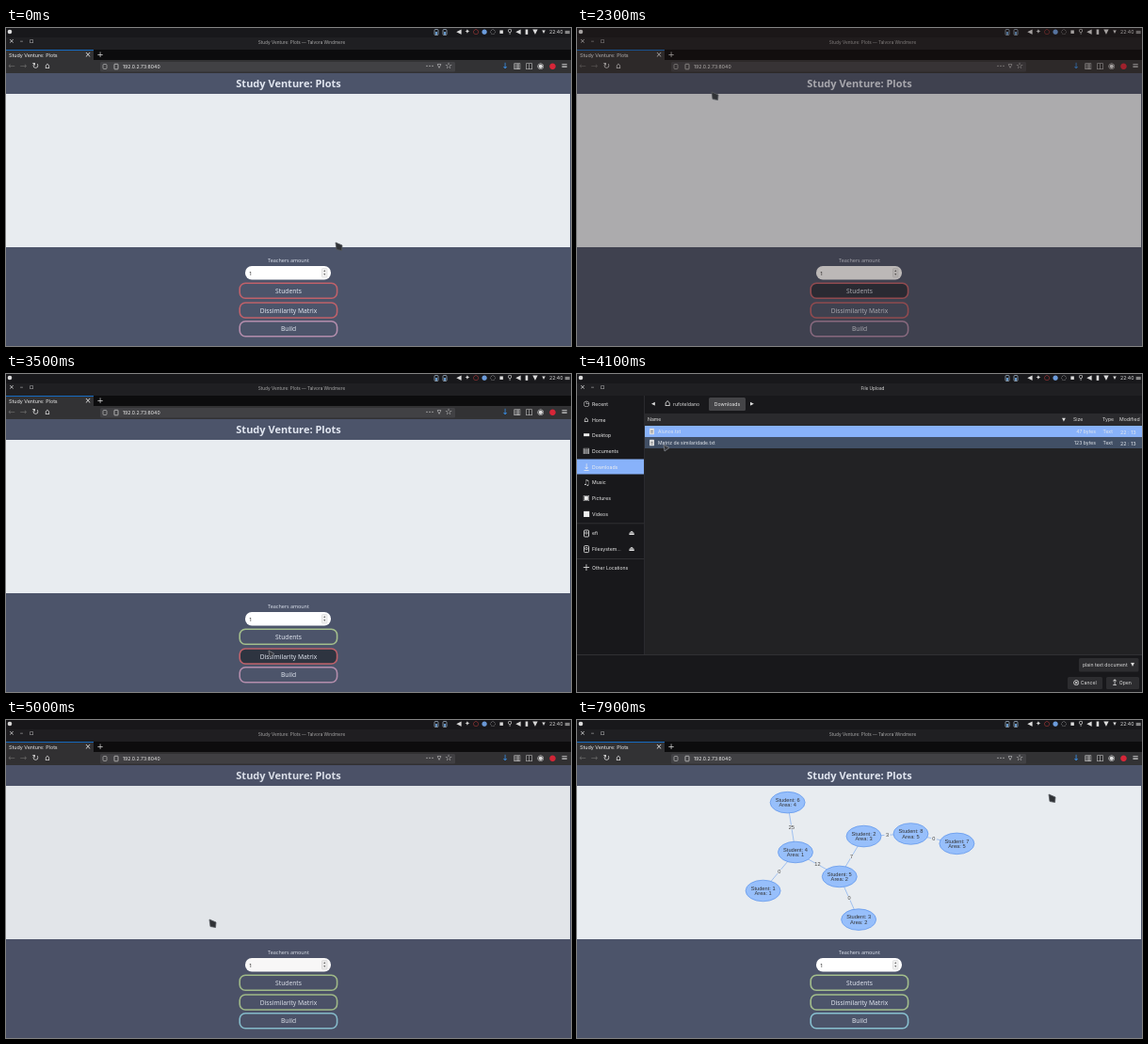
An HTML page with a canvas that plays this animation: 600x338 px, repeating every 8 s.

```html
<!DOCTYPE html>
<html lang="en">
<head>
<meta charset="utf-8">
<title>Study Venture: Plots</title>
<style>
html, body { margin: 0; width: 600px; height: 338px; overflow: hidden; background: #18181b; }
canvas { display: block; }
</style>
</head>
<body>
<canvas id="stage" width="600" height="338"></canvas>
<script>
const g = document.getElementById('stage').getContext('2d');
const UI = 'Inter, sans-serif', PAGE = '"Noto Sans", sans-serif';
const ICON = '"DejaVu Sans", sans-serif', LABEL = '"Liberation Sans", Arial, sans-serif';
const TITLE = 'Study Venture: Plots';
const RED = '#bf616a', GREEN = '#a3be8c', BLUE = '#88c0d0', PURPLE = '#b48ead';
const ACCENT = '#88b2fa', SLATE = '#4c546a';

// When the file dialog starts to open and has closed
const visits = [[600, 2300], [3500, 4800]];

// Pointer stops: arrival time, x, y
const stops = [
  [0, 350, 228], [500, 300, 278], [1400, 153, 77], [2000, 143, 68], [3500, 279, 294],
  [4100, 92, 75], [5000, 216, 212], [5500, 300, 317], [7700, 501, 79]
];

// Tree branches: parent, child, child's area, weight, direction in degrees
const branches = [
  [4, 6, 4, 25, -99], [4, 1, 1, 0, 130], [4, 5, 2, 12, 29], [5, 2, 3, 7, -59],
  [2, 8, 5, 3, -3], [8, 7, 5, 0, 12], [5, 3, 2, 0, 66]
];
const nodes = { 4: { area: 1, x: 232, y: 140.5 } };
for (const [from, to, area, , degrees] of branches) {
  const angle = degrees * Math.PI / 180, length = from === 4 ? 53.5 : 50;
  nodes[to] = {
    area,
    x: nodes[from].x + length * Math.cos(angle),
    y: nodes[from].y + length * Math.sin(angle)
  };
}

const clamp = v => Math.max(0, Math.min(1, v));
const fade = (t, from, to) => clamp(Math.min(t - from, to - t) / 200);

// Waits at a stop, then travels for at most 1200 ms
function pointerAt(t) {
  const i = stops.findIndex(s => s[0] > t);
  if (i < 0) return stops.at(-1).slice(1);
  const [t0, x0, y0] = stops[i - 1], [t1, x1, y1] = stops[i];
  const p = clamp(1 - (t1 - t) / Math.min(1200, t1 - t0));
  const e = p * p * (3 - 2 * p);
  return [x0 + (x1 - x0) * e, y0 + (y1 - y0) * e];
}

function rect(x, y, w, h, color) {
  g.fillStyle = color;
  g.fillRect(x, y, w, h);
}
function paint(fill, stroke, line) {
  if (fill) { g.fillStyle = fill; g.fill(); }
  if (stroke) { g.strokeStyle = stroke; g.lineWidth = line; g.stroke(); }
}
function round(x, y, w, h, r, fill, stroke, line = .8) {
  g.beginPath();
  g.roundRect(x, y, w, h, r);
  paint(fill, stroke, line);
}
function oval(x, y, rx, ry, fill, stroke, line = .8) {
  g.beginPath();
  g.ellipse(x, y, rx, ry, 0, 0, 7);
  paint(fill, stroke, line);
}
function text(s, x, y, size = 5.2, color = '#ddd', font = UI, align = 'left') {
  g.font = `${size}px ${font}`;
  g.textAlign = align;
  g.fillStyle = color;
  g.fillText(s, x, y);
}
function icon(s, x, y, size = 8, color = '#ddd') {
  g.textBaseline = 'middle';
  text(s, x, y, size, color, ICON, 'center');
  g.textBaseline = 'alphabetic';
}
// A row of evenly spaced icons, with some colours by glyph
function icons(row, x, y, step, size, colors = {}) {
  [...row].forEach((s, i) => icon(s, x + i * step, y, size, colors[s]));
}

function desktopBar(title, titleColor) {
  rect(0, 0, 600, 10, '#18181b');
  oval(4, 4, 2.3, 2.3, '#ddd');
  for (const x of [457, 466]) {
    round(x - 2, 1.5, 4, 6, 1, null, '#9ab');
    rect(x - 1, 4, 2, 3, '#69c');
  }
  icons('◀✦○●◌▪⚲◀▮▼▾', 481, 4.3, 9, 7, { '○': '#d44', '●': '#6c9cdc' });
  text('22:40', 577, 6.3);
  icon('≡', 596, 4.5);
  rect(0, 10, 600, 13, '#1f1f22');
  icons('×–▫', 6, 14.5, 10.5, 7);
  text(title, 314, 17, 4.7, titleColor, UI, 'center');
}

function browser() {
  desktopBar(TITLE + ' — Talvora Windmere', '#aaa');
  rect(0, 23, 600, 11, '#0c0c0d');
  rect(0, 23, 93, 11, '#323234');
  rect(0, 23, 93, .7, '#0a84ff');
  text(TITLE, 3, 30.5, 5.4, '#eee');
  icons('×+', 87, 28.3, 13, 8.5);
  rect(0, 34, 600, 14, '#323234');
  icons('←→↻⌂', 6, 41, 12.6, 9, { '←': '#666', '→': '#666' });
  round(100, 36, 377, 10.5, 1.5, '#414144');
  round(103, 38.5, 4, 5, 1, null, '#aaa');
  round(115, 38.3, 4, 5.5, .5, null, '#ccc');
  text('192.0.2.73:8040', 124, 43.2, 5.2, '#eee');
  icons('⋯▿☆', 450, 41, 10, 9);
  icons('↓▥◫◉●≡', 530, 41, 12.6, 8.5, { '↓': '#3b9cff', '●': '#d72638' });
}

function button(name, y, color, hover) {
  round(248.2, y, 103.4, 16, 6, hover ? '#2e3440' : null, color, 1.6);
  text(name, 300, y + 10.5, 6.7, '#dfe4ee', PAGE, 'center');
}

function graph() {
  for (const [from, to, , weight] of branches) {
    const a = nodes[from], b = nodes[to];
    g.beginPath();
    g.moveTo(a.x, a.y);
    g.lineTo(b.x, b.y);
    paint(null, '#6da2ee', .6);
    const x = (a.x + b.x) / 2, y = (a.y + b.y) / 2;
    oval(x, y, 3, 2.5, '#e8ecf0');
    text(weight, x, y + 2, 5.6, '#444', LABEL, 'center');
  }
  for (const id in nodes) {
    const { area, x, y } = nodes[id];
    oval(x, y, 18.5, 11.3, '#97bffb', '#5b93ea', .7);
    text('Student: ' + id, x, y - .8, 5.7, '#343434', LABEL, 'center');
    text('Area: ' + area, x, y + 4.7, 5.7, '#343434', LABEL, 'center');
  }
}

function page(t) {
  const [gotStudents, gotMatrix] = visits.map(v => t > v[1] - 1);
  browser();
  rect(0, 48, 600, 290, SLATE);
  text(TITLE, 300, 63, 'bold 11', '#e1e6f0', PAGE, 'center');
  rect(0, 70, 599, 163, '#e8ecf0');
  text('Teachers amount', 300, 249, 5.4, '#d8dee9', PAGE, 'center');
  round(254, 253, 91, 14.5, 7, '#fff');
  text('1', 258, 262.5, 6, '#222', PAGE);
  round(335.5, 255.5, 5.5, 9.5, 1, '#f2f2f2', '#ccc', .5);
  icon('▴', 338.2, 258, 4, '#666');
  icon('▾', 338.2, 262.3, 4, '#666');
  button('Students', 271.3, t > 2300 ? GREEN : RED, t >= 400 && t <= 2300);
  button('Dissimilarity Matrix', 292, gotMatrix ? GREEN : RED, t >= 3200 && !gotMatrix);
  button('Build', 311.8, gotStudents && gotMatrix ? BLUE : PURPLE, t >= 5400 && t < 6700);
  if (t >= 5700) graph();
}

function fileRow(name, size, y, fill) {
  if (fill) rect(72, y, 528, 12, fill);
  round(77, y + 2.8, 5, 6.5, .6, '#ddd');
  rect(78.3, y + 5, 2.4, .6, '#555');
  rect(78.3, y + 6.8, 2.4, .6, '#555');
  text(name, 86, y + 8, 5.1, '#e4e8ee');
  text(size, 551, y + 8, 5.1, '#e4e8ee', UI, 'right');
  text('Text', 558.5, y + 8, 5.1, '#e4e8ee');
  text('22 : 13', 577, y + 8.7, 5.4, '#e4e8ee');
}

function dialogButton(name, glyph, x, w) {
  round(x, 322, w, 13, 1.5, '#2d2d30');
  icon(glyph, x + 9, 328.5, 9);
  text(name, x + 13.7, 330.3);
}

function dialog(t) {
  const picked = t >= 4500, hover = t >= 4000;
  desktopBar('File Upload', '#ddd');
  rect(0, 23, 600, 315, '#18181b');
  rect(72, 42, 528, 256, '#222224');
  rect(72, 42, 528, 12.5, '#2a2a2d');
  rect(71, 23, .8, 275, '#303034');
  rect(0, 298, 600, .8, '#38383b');

  rect(0, 90.5, 71, 16, ACCENT);
  ['Recent', 'Home', 'Desktop', 'Documents', 'Downloads', 'Music', 'Pictures', 'Videos'].forEach((name, i) => {
    const y = 32 + i * 16.7;
    icon('◷⌂▬▤↓♫▣■'[i], 10, y, 8, '#eee');
    text(name, 16, y + 1.8, 5.2, '#eee');
  });
  rect(7.5, 102, 5, .8, '#eee');
  ['efi', 'Filesystem…'].forEach((name, i) => {
    const y = 169.5 + i * 16.6;
    round(7.5, y - 3.5, 5, 7, 1, null, '#ddd', .9);
    oval(10, y - .5, 1.2, 1.2, null, '#ccc');
    text(name, 16, y + 1.8, 5.2, '#eee');
    icon('⏏', 58, y, 7);
  });
  for (const y of [158.5, 196]) rect(0, y, 71, .7, '#3a3a3d');
  icon('+', 10, 206.5, 10);
  text('Other Locations', 16, 208.4, 5.1, '#eee');

  icon('◀', 81, 32, 5);
  icon('⌂', 96, 31.5, 10);
  text('rufoteldano', 102, 33.7);
  round(140, 25, 39, 14, 1.5, '#444447');
  text('Downloads', 159.5, 33.7, 5.2, '#eee', UI, 'center');
  icon('▶', 186, 32, 5);

  text('Name', 75, 50);
  icon('▼', 517, 48.3, 5);
  text('Size', 527, 50);
  text('Type', 558, 50);
  text('Modified', 576, 50);
  fileRow('Alunos.txt', '47 bytes', 55, picked ? null : ACCENT);
  fileRow('Matriz de similaridade.txt', '123 bytes', 67, picked ? ACCENT : hover ? '#414f65' : null);

  round(533, 302, 63.5, 14.5, 1.5, '#2d2d30');
  text('plain text document', 537, 311.2, 5.1);
  icon('▾', 590, 309);
  dialogButton('Cancel', '⊗', 521, 37);
  dialogButton('Open', '↥', 562, 35);
}

function pointer(t, soft) {
  const [x, y] = pointerAt(t);
  const shape = soft ? [[0, 0], [6, 3.5], [1, 7]] : [[0, 0], [7, 3], [6.5, 8.5], [1, 7.5]];
  g.beginPath();
  shape.forEach(([dx, dy]) => g.lineTo(x + dx, y + dy));
  g.closePath();
  paint(soft ? '#36383e' : '#303236', soft ? '#85888e' : '#55585d', .8);
}

function draw() {
  const t = Math.floor(performance.now() % 8000 / 100) * 100;
  const open = Math.max(...visits.map(([from, to]) => fade(t, from, to)));
  const dim = Math.max(...visits.map(([from, to]) => fade(t, from, to + 220)));
  if (open < 1) page(t);
  g.globalAlpha = .3 * dim;
  rect(0, 0, 600, 338, '#211612');
  g.globalAlpha = open;
  dialog(t);
  g.globalAlpha = 1;
  pointer(t, open > .5 || t >= 3200 && t < 3700);
  requestAnimationFrame(draw);
}
draw();
</script>
</body>
</html>
```
